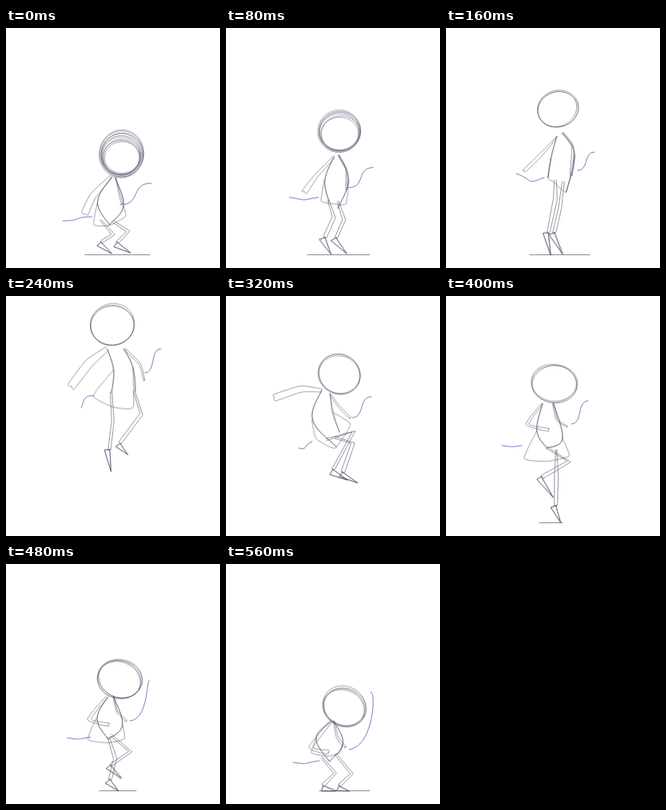
These frames come from a looping animation (268 by 300 pixels, 640 ms). An HTML page with a canvas:

```html
<!DOCTYPE html>
<html lang="en">
<head>
<meta charset="utf-8">
<title>Skipping sketch</title>
<style>
html, body { margin: 0; width: 100%; height: 100%; overflow: hidden; background: #fff; }
canvas { display: block; }
</style>
</head>
<body>
<canvas id="stage" width="268" height="300"></canvas>
<script>
const ctx = document.getElementById('stage').getContext('2d');
const POSE_MS = 80;
const FLOOR = 283;
const INK = '82,82,104', ROPE = '128,72,178';

// Joints are "x,y". An arm is elbow and hand, a leg is hip, knee, ankle and toe.
// A rope is start, end and bow. A head is centre, radii, tilt and ring spread, ring count.
const crouch = pose({
  head: '145,157 28,30 0,6 9', back: '132,186 115,218 130,246', chest: '137,187 147,222 130,246',
  backArm: '109,210 99,232', frontArm: '142,206 145,219', sleeve: '4',
  leg: '119,240 134,258 119,268 132,282', otherLeg: '134,242 153,254 139,268 156,281',
  hem: '110,246 130,247 150,235', rope: '71,241 108,236 0,0', otherRope: '143,221 182,194 0,0', ground: '99,180'
});
const tiptoe = pose({
  head: '140,101 26,23 -20,1 3', back: '139,136 132,162 128,187', chest: '146,131 161,158 151,205',
  backArm: '117,160 98,178', frontArm: '159,148 157,183', sleeve: '2',
  leg: '137,190 137,215 128,256 131,284', otherLeg: '147,192 143,225 136,256 146,283',
  hem: '128,187 135,192 150,205', rope: '88,182 123,187 0,9', otherRope: '165,178 186,155 0,0', ground: '105,180'
});
const leap = pose({
  head: '133,36 28,26 -10,1 3', back: '127,66 135,92 132,121', chest: '148,66 159,90 162,119',
  backArm: '104,84 82,113', frontArm: '168,85 173,105', sleeve: '5',
  leg: '131,120 134,155 130,192 132,219', otherLeg: '161,119 170,148 143,184 153,198',
  hem: '109,125 134,139 159,139', rope: '110,125 94,140 -4,-3', otherRope: '174,96 194,66 0,0'
});
const tuck = pose({
  head: '142,97 27,25 25,1 3', back: '120,118 108,155 138,189', chest: '130,122 134,146 142,170',
  backArm: '94,116 61,127', frontArm: '142,138 155,152', sleeve: '4',
  leg: '126,179 160,169 134,217 152,230', otherLeg: '136,177 159,184 146,220 165,234',
  hem: '113,178 136,190 156,160', rope: '91,190 108,182 0,4', otherRope: '158,152 182,126 0,0'
});
const landing = pose({
  head: '136,109 29,24 5,1 3', back: '121,135 114,168 126,190', chest: '134,134 146,178 126,190',
  backArm: '102,160 128,167', frontArm: '139,154 152,163', sleeve: '2',
  leg: '138,192 138,225 138,262 144,283', otherLeg: '126,190 154,207 120,226 134,252',
  hem: '98,203 126,207 154,200', rope: '70,187 95,187 0,2', otherRope: '157,160 178,131 0,0', ground: '117,146'
});
const settle = pose({
  head: '148,178 28,25 28,2 4', back: '133,196 113,218 130,247', chest: '135,197 146,224 130,247',
  backArm: '107,229 128,235', frontArm: '140,217 149,229', sleeve: '3',
  leg: '119,242 136,262 122,277 138,284', otherLeg: '137,238 158,262 142,277 155,284',
  hem: '107,236 128,240 143,236', rope: '84,248 117,246 0,3', otherRope: '154,232 181,160 13,-4', ground: '117,180'
});
const poses = [crouch, between(crouch, tiptoe), tiptoe, leap, tuck, landing, between(landing, settle), settle];

function pose(parts) {
  const read = text => text.split(' ').map(pair => pair.split(',').map(Number));
  return Object.fromEntries(Object.entries(parts).map(([name, text]) => [name, read(text)]));
}

function between(a, b) {
  const mid = (p, q) => Array.isArray(p) ? p.map((v, i) => mid(v, q[i])) : (p + q) / 2;
  return Object.fromEntries(Object.keys(a).map(name => [name, mid(a[name], b[name])]));
}

let seed = 1;
function wobble(size) {
  seed = (seed * 16807) % 2147483647;
  return (seed / 2147483647 - 0.5) * 2 * size;
}

function pen(rgb, alpha, width = 0.9) {
  ctx.strokeStyle = `rgba(${rgb},${alpha})`;
  ctx.lineWidth = width;
}

// Repeated, slightly shaky passes give the pencil look.
function sketch(points, { curve = 1 / 5, passes = 2, shake = 0.7 } = {}) {
  for (let pass = 0; pass < passes; pass++) {
    const shaky = points.map(p => p.map(v => v + wobble(shake)));
    const at = i => shaky[Math.max(0, Math.min(shaky.length - 1, i))];
    ctx.beginPath();
    ctx.moveTo(...shaky[0]);
    for (let i = 0; i < shaky.length - 1; i++) {
      const [before, from, to, after] = [at(i - 1), at(i), at(i + 1), at(i + 2)];
      const leave = from.map((v, k) => v + (to[k] - before[k]) * curve);
      const arrive = to.map((v, k) => v - (after[k] - from[k]) * curve);
      ctx.bezierCurveTo(...leave, ...arrive, ...to);
    }
    ctx.stroke();
  }
}

// Point at a sideways distance from a, seen along the way from a to b.
function beside(a, b, distance, origin = a) {
  const dx = b[0] - a[0], dy = b[1] - a[1], length = Math.hypot(dx, dy) || 1;
  return [origin[0] - dy / length * distance, origin[1] + dx / length * distance];
}

function drawLimb(joints, width, curve) {
  const last = joints.length - 1;
  for (const side of [-1, 1]) {
    const edge = joints.map((joint, i) =>
      beside(joints[Math.max(0, i - 1)], joints[Math.min(last, i + 1)], side * width * (i ? 1 : 0.5), joint));
    sketch([...edge, joints[last]], { curve, passes: 1 });
  }
}

function drawLeg([hip, knee, ankle, toe]) {
  pen(INK, 0.68);
  drawLimb([hip, knee, ankle], 2, 0);
  sketch([ankle, beside(ankle, toe, 7), toe, ankle], { curve: 0 });
}

function drawHead([[x, y], [rx, ry], [tilt, spread], [rings]]) {
  rings = Math.round(rings);
  pen(INK, 0.55);
  for (let i = 0; i < rings; i++) {
    const inset = spread * i / (rings - 1);
    ctx.beginPath();
    ctx.ellipse(x + wobble(0.7), y + inset * 0.8 + wobble(0.7), rx - inset, ry - inset * 1.7,
      (tilt + wobble(12)) * Math.PI / 180, 0, Math.PI * 2);
    ctx.stroke();
  }
}

function drawRope([[x0, y0], [x1, y1], [bowX, bowY]]) {
  const reach = (x1 - x0) * 0.7;
  pen(ROPE, 0.8, 1);
  ctx.beginPath();
  ctx.moveTo(x0, y0);
  ctx.bezierCurveTo(x0 + reach + bowX, y0 + bowY, x1 - reach + bowX * 2, y1 + bowY, x1, y1);
  ctx.stroke();
}

function drawPose(p, index) {
  seed = 97 + index * 1013;
  ctx.fillStyle = '#fff';
  ctx.fillRect(0, 0, 268, 300);

  pen(INK, 0.32);
  sketch([p.back[1], ...p.hem, p.chest[1]], { curve: 0.08 });
  pen(INK, 0.6);
  sketch(p.back);
  sketch(p.chest);
  drawLimb([p.back[0], ...p.backArm], p.sleeve[0][0], 0.1);
  drawLimb([p.chest[0], ...p.frontArm], 1.2, 0.1);
  drawLeg(p.leg);
  drawLeg(p.otherLeg);
  drawHead(p.head);
  drawRope(p.rope);
  drawRope(p.otherRope);

  if (p.ground) {
    const [[left, right]] = p.ground;
    pen(INK, 0.75);
    sketch([[left, FLOOR + 0.5], [right, FLOOR + 0.5]], { passes: 1, shake: 0 });
  }
}

ctx.lineCap = ctx.lineJoin = 'round';
function tick() {
  const index = Math.floor(performance.now() / POSE_MS) % poses.length;
  drawPose(poses[index], index);
  requestAnimationFrame(tick);
}
tick();
</script>
</body>
</html>
```
